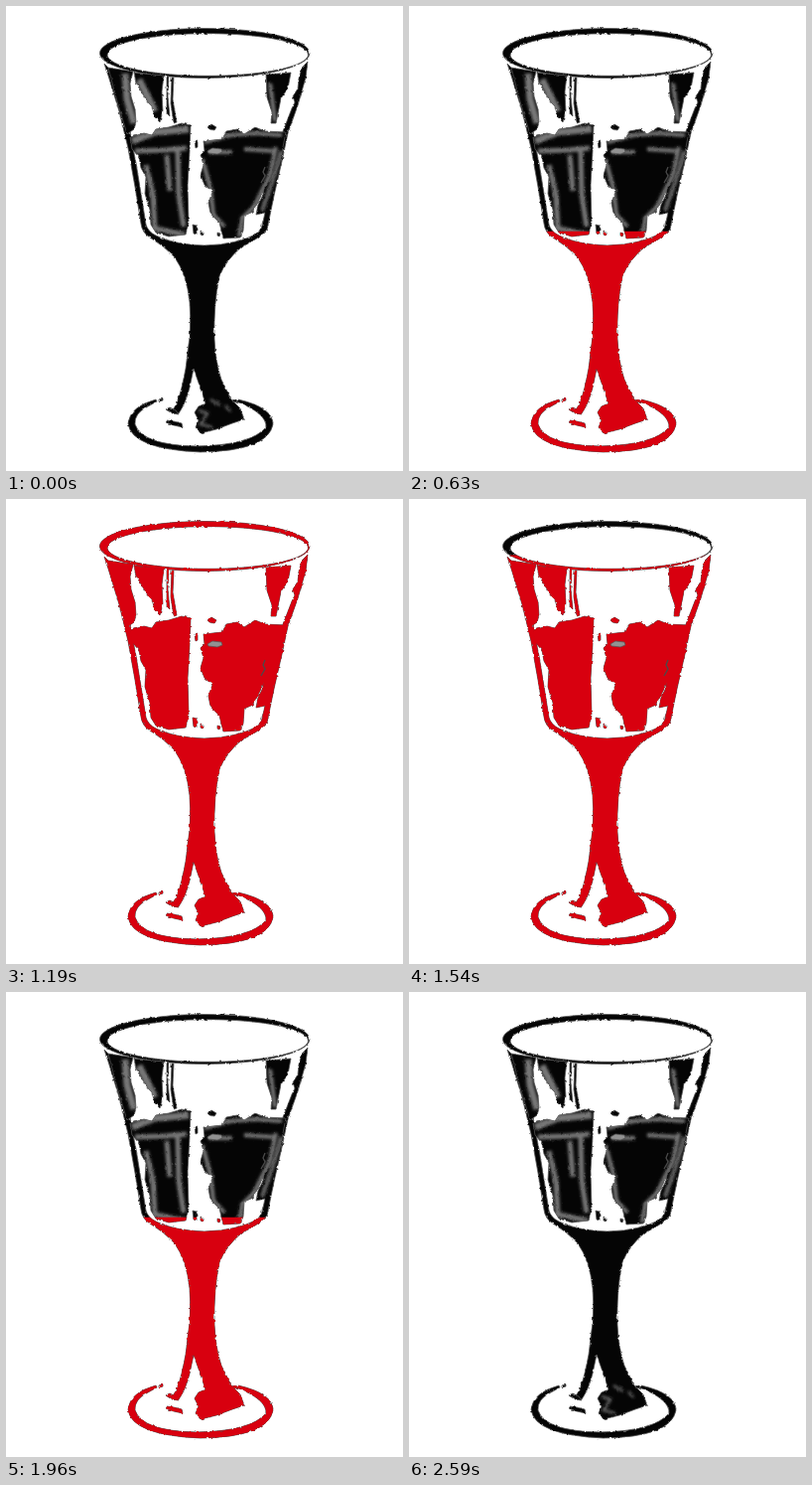
An HTML page that plays this animation: 400 px wide and 468 px high, repeating every 2660 ms.

```html
<!DOCTYPE html>
<html lang="en">
<head>
<meta charset="utf-8">
<title>Filling glass</title>
<style>
  html, body { margin: 0; width: 100%; height: 100%; overflow: hidden; background: #fff; }
  svg { position: absolute; left: 0; top: 0; width: 400px; height: 468px; }
  .ink { fill: #050505; stroke: #555; stroke-width: .8; }
  .wine { fill: #d8000f; animation: fill 2660ms infinite; }

  /* 38 ticks of 70 ms: rise, hold, fall */
  @keyframes fill {
    0%     { clip-path: inset(468px 0 0 0); animation-timing-function: step-end; }
    2.63%  { clip-path: inset(440px 0 0 0); animation-timing-function: steps(7); }
    21.05% { clip-path: inset(255px 0 0 0); animation-timing-function: steps(8); }
    42.1%  { clip-path: inset(28px 0 0 0); animation-timing-function: step-end; }
    44.73% { clip-path: inset(0 0 0 0); animation-timing-function: step-end; }
    55.26% { clip-path: inset(28px 0 0 0); animation-timing-function: steps(8); }
    76.31% { clip-path: inset(255px 0 0 0); animation-timing-function: steps(7); }
    94.73% { clip-path: inset(440px 0 0 0); animation-timing-function: step-end; }
    97.36%, 100% { clip-path: inset(468px 0 0 0); }
  }
</style>
</head>
<body>
<svg viewBox="0 0 400 468">
  <defs>
    <filter id="rough" filterUnits="userSpaceOnUse" x="0" y="0" width="400" height="468" color-interpolation-filters="sRGB">
      <feTurbulence type="fractalNoise" baseFrequency=".25" numOctaves="2" seed="4"/>
      <feDisplacementMap in="SourceGraphic" scale="2.6" xChannelSelector="R" yChannelSelector="G"/>
    </filter>
    <filter id="soft" x="-50%" y="-50%" width="200%" height="200%"><feGaussianBlur stdDeviation="1.6"/></filter>

    <path id="rim" fill-rule="evenodd" d="M94.500 47.500a105.700 25 0 0 1 211.400 0a105.700 25 0 0 1-211.400 0zM102 49a101.200 21.300 0 0 0 202.400 0a101.200 21.300 0 0 0-202.400 0z"/>

    <path id="walls" d="M99 58L105 64L117 104L126 134L131 158L137 195L141 220Q143 227 151 231Q169 240 200 241Q233 240 253 229Q258 225 259 217
      L261 208L252 210L254 200L259 190L260 178L268 163L277 146L279 126L283 116L288 103L291 97L289 91L294 83L295 73L298 62L304 56L302 72L294 100L284 128L278 156L270 191L263 225
      Q254 235 238 242Q222 255 215 272Q209 300 210 335Q211 358 217 376L227 396L236 405L240 416L228 420L212 426L196 430L191 424
      L194 417L190 409L194 403L201 400L195 382L189 365L185 384Q181 400 174 410L167 408Q173 400 177 384Q182 364 183 348Q187 325 185 298
      Q182 270 170 253Q160 242 145 233Q137 228 136 219L130 182L123 143L114 106L103 70z"/>

    <path id="panels" d="M103 62L128 66L125 78L126 91L130 104L131 117L129 124L122 129L112 96z
      M129 67L159 70L157 86L158 106L155 117L150 112L147 101L141 94L135 84L131 77z
      M125 132L139 128L147 130L151 124L164 122L177 118L186 120L185 146L183 180L184 218L181 230L164 232L151 228L146 220L145 205L140 189L141 172L136 163L134 152L127 144z
      M199 136L218 134L222 126L233 124L240 129L251 122L261 126L282 127L278 147L275 160L266 176L261 182L257 191L249 207L240 211L239 226L236 233L219 234L215 218L206 209L204 198L208 187L200 180L196 170L199 160L196 150L200 146z
      M262 69L287 67L284 83L277 93L274 108L272 118L267 118L268 107L263 92z"/>

    <path id="marks" d="M162 71h2l-1 20 2 20-3-3zM167 72h2l-1 22 4 23-3 1-3-20z
      M203 122l4-3 5 3-2 3-5-1zM220 128l5 1-3 2zM190 136l3-1v7l-2 1z
      M188 220l4 1v9l-3-1zM196 226l2 1v4l-2-1zM213 228l3 1-1 3-2-1z
      M161 406l4-2 6 3 3 4-7-1zM162 417l7 1 8 2 1 4-9-2-6-2z
      M154 396l4-1v2l-4 1zM229 396l4 1-1 2-4-1z"/>

    <path id="foot" d="M152 398L143 403Q129 410 130 421Q137 442 192 443Q247 442 262 424Q263 410 232 398L234 396Q269 404 269 421Q264 448 196 449Q126 446 123 420Q125 403 151 396z"/>

    <clipPath id="glass"><use href="#panels"/></clipPath>
    <g id="shape">
      <use href="#rim"/><use href="#walls"/><use href="#panels"/><use href="#marks"/><use href="#foot"/>
    </g>
  </defs>

  <g filter="url(#rough)">
    <use class="ink" href="#shape"/>
    <g clip-path="url(#glass)" fill="none" stroke="#777" stroke-width="5">
      <g filter="url(#soft)">
        <path d="M120 68L122 94L129 118M134 74L150 106M127 136L150 127L184 124" stroke-width="7"/>
        <path d="M130 146L160 145L182 143M141 160L148 190L150 224L180 230M162 150L165 186M173 146L174 190L179 222"/>
        <path d="M200 137L226 130L252 128L278 130M204 147H228M240 144L270 146" stroke-width="4"/>
        <path d="M198 154L206 184L209 210L220 222M272 142L266 170L250 202L238 214L235 232M266 78L271 116" stroke-width="4"/>
      </g>
    </g>
    <g filter="url(#soft)" fill="none" stroke="#666" stroke-width="4">
      <path d="M277 146L270 172L258 206"/>
      <path stroke-width="2.500" d="M194 407L203 410L196 421L208 424M206 396L216 402M221 402L226 408"/>
    </g>
  </g>
</svg>

<svg class="wine" viewBox="0 0 400 468">
  <use href="#shape" filter="url(#rough)"/>
</svg>

<svg viewBox="0 0 400 468">
  <path fill="#929292" stroke="#555" stroke-width=".7" d="M203 146l5-3 9 1 1 3-5 2-9-1z"/>
  <path fill="none" stroke="#4a4a4a" stroke-width="1.300" d="M261 162l-2 5 2 4-4 7"/>
</svg>
</body>
</html>
```
